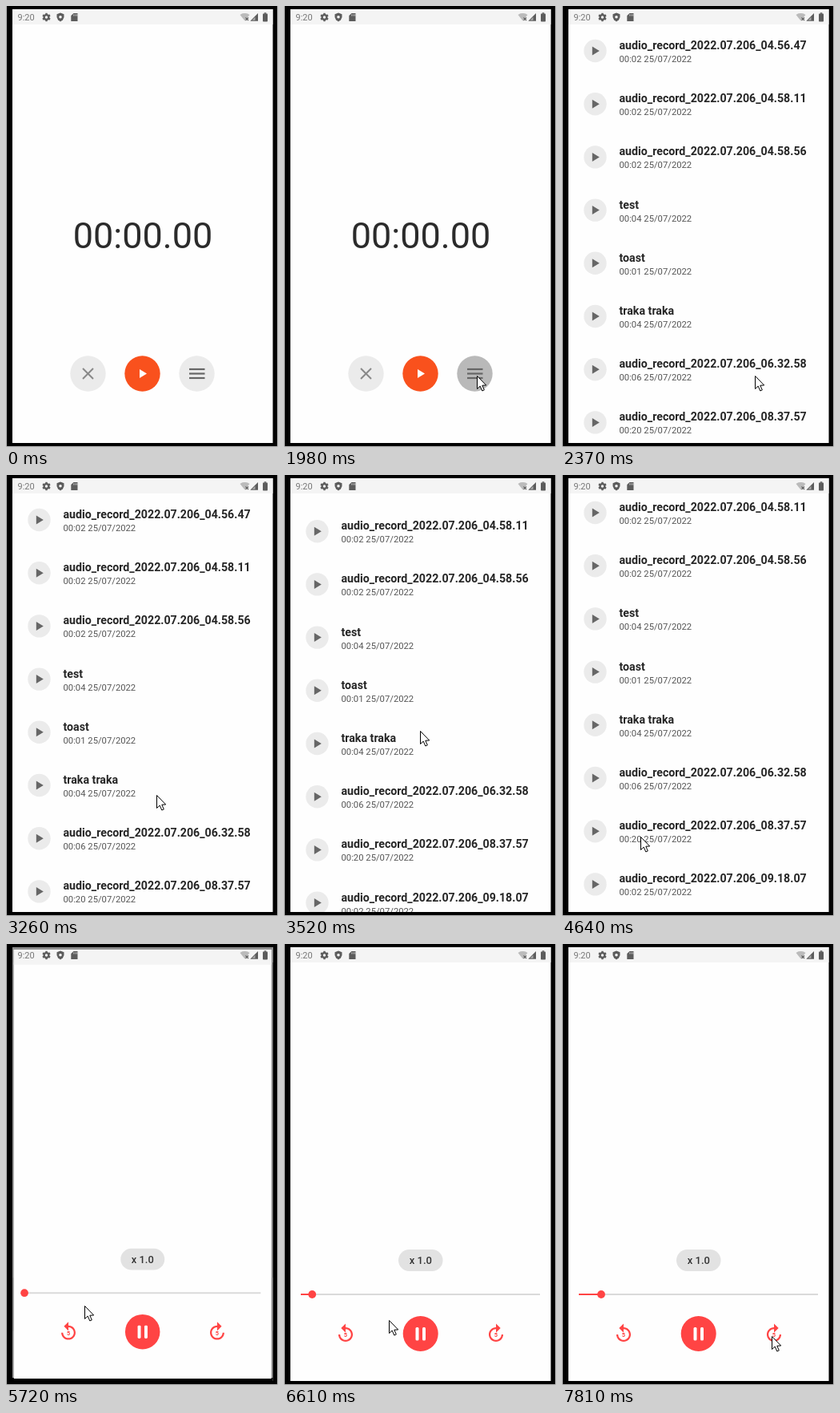
These frames come from a looping animation (340x550 px, 8000 ms). An HTML page with a canvas:

```html
<!DOCTYPE html>
<html lang="en">
<head>
<meta charset="utf-8">
<title>Audio recorder</title>
<style>
  html, body { margin: 0; width: 100%; height: 100%; overflow: hidden; background: #fff; }
  canvas { display: block; }
</style>
</head>
<body>
<canvas id="stage" width="340" height="550"></canvas>
<script>
const ctx = document.getElementById('stage').getContext('2d');
const LOOP = 8000;
const RED = '#ff4444';
const SCREEN = { x: 8, y: 4, w: 325.5, h: 541 };
const CENTER = { x: 171, y: 274 };
const ROW_HEIGHT = 66.2;

const ROWS = [
  ['audio_record_2022.07.206_04.56.47', '00:02'],
  ['audio_record_2022.07.206_04.58.11', '00:02'],
  ['audio_record_2022.07.206_04.58.56', '00:02'],
  ['test', '00:04'],
  ['toast', '00:01'],
  ['traka traka', '00:04'],
  ['audio_record_2022.07.206_06.32.58', '00:06'],
  ['audio_record_2022.07.206_08.37.57', '00:20'],
  ['audio_record_2022.07.206_09.18.07', '00:02'],
];

// Every track holds its value until the next entry: [time, ...values]
const CURSOR = [
  [0, -50, -50], [550, 266, 537], [710, 262, 489], [860, 241, 461],
  [2520, 236, 440], [2650, 207, 377], [2790, 161, 234], [2980, 133, 205],
  [3130, 158, 295], [3260, 188, 399], [3400, 181, 354], [3520, 170, 319],
  [3690, 168, 312], [3830, 165, 298], [3980, 160, 255], [4100, 154, 217],
  [4240, 142, 245], [4370, 124, 305], [4490, 104, 376], [4640, 98, 451],
  [6610, 131, 469], [6750, 138, 477], [6870, 143, 482], [6990, 146, 485],
  [7300, 192, 485], [7450, 225, 487], [7570, 248, 488], [7690, 258, 489], [7810, 262, 489],
];
const SCROLL = [[0, 0], [3400, 17], [3520, 52], [3690, 57], [3830, 69], [3980, 75.2]];
const GLOW = [[0, 0], [3980, 0.05], [4100, 0.1], [4240, 0.08], [4370, 0.04], [4490, 0]];
const THUMB = [[0, 21.4], [6610, 35.2], [7570, 49]];
// Window scale and opacity of an opening screen
const OPEN_LIST = [[2100, 0.93, 0.55], [2250, 0.989, 1], [2370, 1, 1]];
const OPEN_PLAYER = [[5600, 0.93, 0.55], [5720, 0.989, 1], [5860, 0.997, 1], [5980, 1, 1]];

function at(track, t) {
  let current = track[0];
  for (const entry of track) if (entry[0] <= t) current = entry;
  return current.slice(1);
}

function rect(x, y, w, h, color) {
  ctx.fillStyle = color;
  ctx.fillRect(x, y, w, h);
}

function disc(x, y, r, color) {
  ctx.fillStyle = color;
  ctx.beginPath();
  ctx.arc(x, y, r, 0, 7);
  ctx.fill();
}

function pill(x, y, w, h, r, color) {
  ctx.fillStyle = color;
  ctx.beginPath();
  ctx.roundRect(x, y, w, h, r);
  ctx.fill();
}

function poly(points, color) {
  ctx.fillStyle = color;
  ctx.beginPath();
  for (const [x, y] of points) ctx.lineTo(x, y);
  ctx.closePath();
  ctx.fill();
}

function line(x1, y1, x2, y2, color, width = 2) {
  ctx.strokeStyle = color;
  ctx.lineWidth = width;
  ctx.beginPath();
  ctx.moveTo(x1, y1);
  ctx.lineTo(x2, y2);
  ctx.stroke();
}

function text(string, x, y, size, color, weight = 400, align = 'left') {
  ctx.font = `${weight} ${size}px Roboto, sans-serif`;
  ctx.textAlign = align;
  ctx.fillStyle = color;
  ctx.fillText(string, x, y);
}

function playIcon(x, y, color) {
  poly([[x - 4, y - 5.5], [x + 5, y], [x - 4, y + 5.5]], color);
}

function background() {
  rect(SCREEN.x, SCREEN.y, SCREEN.w, SCREEN.h, '#fefefe');
  rect(SCREEN.x, SCREEN.y, SCREEN.w, 19, '#f4f4f4');
}

function recorder(t) {
  background();
  text('00:00.00', 171, 302, 45, '#2b2b2b', 400, 'center');
  const y = 458.5;
  disc(102.5, y, 22.2, '#ebebeb');
  line(96, y - 6.5, 109, y + 6.5, '#888');
  line(96, y + 6.5, 109, y - 6.5, '#888');
  disc(170.5, y, 22.2, '#f9511d');
  playIcon(171, y, '#fff');
  disc(238.5, y, 22.2, t >= 1980 ? '#b9b9b9' : '#ebebeb');
  for (const dy of [-5.5, 0, 5.5]) line(229, y + dy, 248.5, y + dy, '#666', 2.2);
}

function list(t) {
  background();
  ctx.save();
  ctx.beginPath();
  ctx.rect(SCREEN.x, 23, SCREEN.w, 522);
  ctx.clip();
  const [scroll] = at(SCROLL, t);
  ROWS.forEach(([title, duration], i) => {
    const y = 56 + i * ROW_HEIGHT - scroll;
    if (i === 7 && t >= 5480) rect(SCREEN.x, y - 28, SCREEN.w, ROW_HEIGHT, '#ededed');
    disc(41.5, y, 14.2, '#ebebeb');
    playIcon(41.8, y, '#666');
    text(title, 71.5, y - 2, 14.2, '#262626', 700);
    text(duration + ' 25/07/2022', 71.5, y + 14, 11.25, '#555');
  });
  ctx.fillStyle = `rgba(90, 90, 90, ${at(GLOW, t)[0]})`;
  ctx.beginPath();
  ctx.ellipse(171, 575, 230, 55, 0, 0, 7);
  ctx.fill();
  ctx.restore();
}

const SKIP_ARROW = new Path2D('M12 5V1L7 6l5 5V7c3.31 0 6 2.69 6 6s-2.69 6-6 6-6-2.69-6-6H4' +
  'c0 4.42 3.58 8 8 8s8-3.58 8-8-3.58-8-8-8z');

function skipIcon(x, y, direction) {
  ctx.save();
  ctx.translate(x, y);
  ctx.scale(-direction * 1.13, 1.13);
  ctx.translate(-12, -13);
  ctx.fillStyle = RED;
  ctx.fill(SKIP_ARROW);
  ctx.restore();
  text('5', x, y + 3.2, 7.5, RED, 700, 'center');
}

function player(t) {
  background();
  pill(143, 381, 55.5, 27, 13.5, '#e2e2e2');
  text('x 1.0', 170.8, 399, 13, '#333', 500, 'center');
  const [thumb] = at(THUMB, t);
  line(21, 437, 320, 437, '#dadada');
  line(21, 437, thumb, 437, RED);
  disc(thumb, 437, 4.9, RED);
  skipIcon(77, 487, -1);
  skipIcon(265, 487, 1);
  disc(170.7, 486, 22, RED);
  pill(164.5, 478, 4, 16.5, 1.5, '#fff');
  pill(173, 478, 4, 16.5, 1.5, '#fff');
}

function statusIcons() {
  const dark = '#5c5c5c';
  text('9:20', 14.5, 18, 11, '#777');

  ctx.strokeStyle = dark;
  ctx.lineWidth = 2.4;
  ctx.beginPath();
  ctx.arc(50.5, 14, 2.9, 0, 7);
  ctx.stroke();
  for (let i = 0; i < 6; i++) {
    const a = i * Math.PI / 3 + Math.PI / 6;
    const c = Math.cos(a), s = Math.sin(a);
    line(50.5 + 3 * c, 14 + 3 * s, 50.5 + 5.2 * c, 14 + 5.2 * s, dark, 2.4);
  }

  poly([[68, 8.5], [72.5, 10.3], [72.5, 14], [71, 17.2], [68, 19.5],
    [65, 17.2], [63.5, 14], [63.5, 10.3]], dark);
  disc(68, 13.7, 1.8, '#f4f4f4');
  poly([[84.5, 9], [89.5, 9], [89.5, 19], [81.3, 19], [81.3, 12]], dark);
  for (const x of [84.3, 86.2, 88]) rect(x, 10.3, 0.9, 2.2, '#ccc');

  poly([[292.5, 11], [295.5, 9.3], [299, 9], [302, 9.6], [304.5, 11], [298.5, 18.5]], '#bbb');
  line(299.5, 14.5, 303, 18, dark, 1.1);
  line(299.5, 18, 303, 14.5, dark, 1.1);
  poly([[315, 9], [315, 18.7], [305.3, 18.7]], dark);
  poly([[311.5, 13.8], [311.5, 17.7], [307.6, 17.7]], '#aaa');
  pill(321, 9.5, 6, 10, 0.8, dark);
  rect(322.7, 8.3, 2.6, 1.5, dark);
}

function opening(previous, next, track, t) {
  const [scale, alpha] = at(track, t);
  if (scale < 1) {
    previous(t);
    rect(SCREEN.x, SCREEN.y, SCREEN.w, SCREEN.h, `rgba(0, 0, 0, ${alpha < 1 ? 0.1 : 0.42})`);
    if (alpha === 1) rect(SCREEN.x, 541, SCREEN.w, 8, '#000');
  }
  ctx.save();
  ctx.globalAlpha = alpha;
  ctx.translate(CENTER.x, CENTER.y);
  ctx.scale(scale, scale);
  ctx.translate(-CENTER.x, -CENTER.y);
  next(t);
  ctx.restore();
}

function pointer(t) {
  const [x, y] = at(CURSOR, t);
  ctx.save();
  ctx.translate(x + 0.5, y + 0.5);
  poly([[0, 0], [0, 16], [3.7, 12.6], [6.3, 18.5], [8.8, 17.4], [6.3, 11.7], [11.2, 11.5]], '#fff');
  ctx.strokeStyle = '#000';
  ctx.lineWidth = 1;
  ctx.stroke();
  ctx.restore();
}

function draw(t) {
  rect(0, 0, 340, 550, '#bbb');
  rect(1, 0, 338, 549, '#000');
  if (t < 2100) recorder(t);
  else if (t < 5600) opening(recorder, list, OPEN_LIST, t);
  else opening(list, player, OPEN_PLAYER, t);
  statusIcons();
  pointer(t);
}

const start = performance.now();
function tick() {
  draw((performance.now() - start) % LOOP);
  requestAnimationFrame(tick);
}
tick();
</script>
</body>
</html>
```
